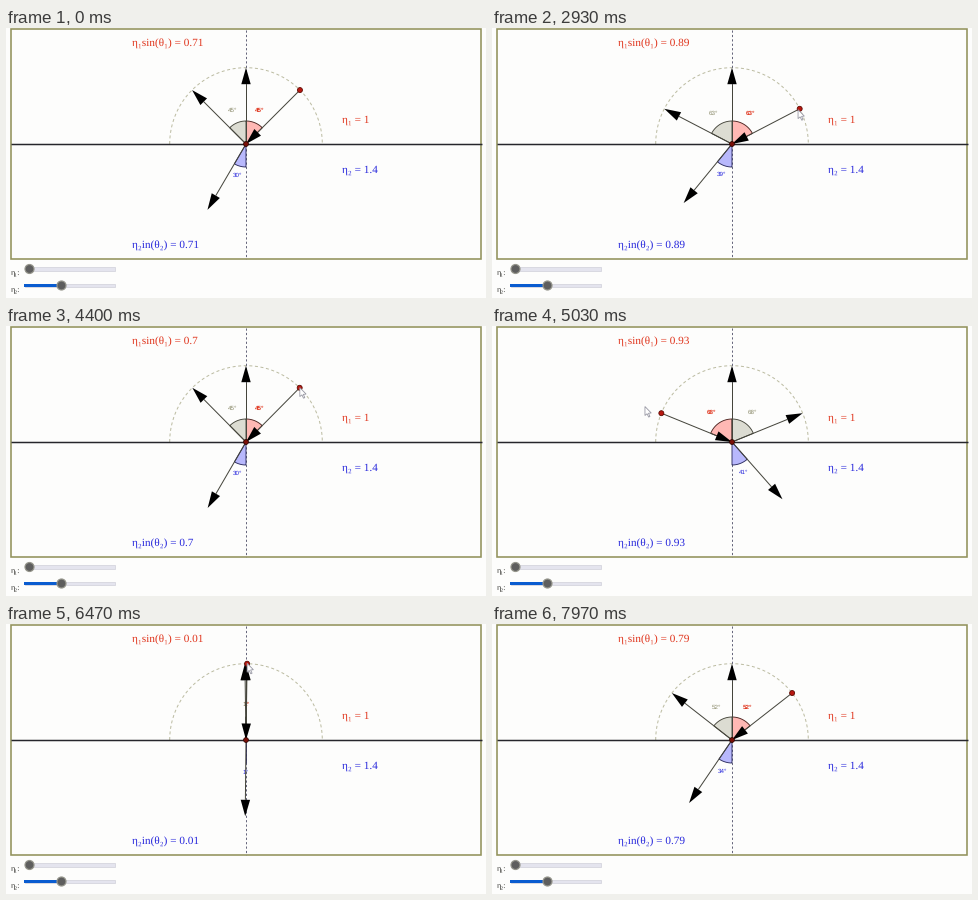
Write a matplotlib script that moves like this. It is 480 px wide and 270 px high and loops after 8000 ms.

```python
import math
import numpy as np
import matplotlib.pyplot as plt
from matplotlib.animation import FuncAnimation
from matplotlib.patches import Circle, Polygon, Rectangle

W, H, DPI = 480, 270, 60
PX = 72 / DPI                      # points per pixel
FRAMES, STEP = 250, 32             # 8000 ms
OX, OY, R = 240, 116, 76.3         # point of incidence, ray length
N1, N2 = 1, 1.4

PAPER, BORDER, INK = "#fdfdfc", "#92925c", "#26262c"
RED, BLUE, MUTED = "#e0341c", "#2626dc", "#8c8c6c"

plt.rcParams.update({
    "font.family": ["Liberation Serif", "DejaVu Serif"],
    "text.hinting": "none",
})

# pointer angle from the normal in degrees, positive to the right
ANGLE = [(0, 45), (1900, 45), (2070, 48.4), (2530, 52), (3000, 65),
         (3350, 73), (3770, 64), (4230, 60), (4980, -67.6), (5060, -68),
         (5400, -80), (6000, -40.4), (6060, -40), (7030, 64), (7400, 52),
         (8000, 52)]
REACH = [(0, 76), (4200, 74), (5030, 94), (5400, 93), (6030, 81),
         (7030, 74), (8000, 74)]
ENTER, GRAB, RELEASE, LEAVE = 1730, 1900, 7400, 7540


def curve(keys, t):
    """Monotone cubic through (time, value) keys."""
    x, y = np.array(keys, float).T
    d = np.diff(y) / np.diff(x)
    m = np.zeros(len(x))
    for i in range(1, len(x) - 1):
        if d[i - 1] * d[i] > 0:
            m[i] = 2 * d[i - 1] * d[i] / (d[i - 1] + d[i])
    i = min(max(int(np.searchsorted(x, t, side="right")) - 1, 0), len(d) - 1)
    h = x[i + 1] - x[i]
    s = (t - x[i]) / h
    return ((2 * s**3 - 3 * s**2 + 1) * y[i] + (s**3 - 2 * s**2 + s) * h * m[i]
            + (3 * s**2 - 2 * s**3) * y[i + 1] + (s**3 - s**2) * h * m[i + 1])


def polar(deg, r):
    """Point at an angle clockwise from straight up."""
    a = math.radians(deg)
    return np.array([OX + r * math.sin(a), OY - r * math.cos(a)])


def mix(a, b, s):
    return np.array(a) + (np.array(b) - np.array(a)) * s


fig = plt.figure(figsize=(W / DPI, H / DPI), dpi=DPI, facecolor=PAPER)
ax = fig.add_axes([0, 0, 1, 1])
ax.set(xlim=(0, W), ylim=(H, 0))
ax.axis("off")


def line(x, y, color, width, **kw):
    kw.setdefault("solid_capstyle", "butt")
    return ax.plot(x, y, color=color, lw=width * PX, **kw)[0]


def label(x, y, s, color, size, **kw):
    return ax.text(x, y, s, color=color, fontsize=size * PX, **kw)


def disc(x, y, r, fill, edge, width=0.8, z=6):
    return ax.add_patch(Circle((x, y), r, fc=fill, ec=edge, lw=width * PX, zorder=z))


class Ray:
    def __init__(self):
        self.shaft = line([], [], "#45453c", 1, zorder=4)
        self.head = ax.add_patch(Polygon(np.zeros((3, 2)), fc="black", lw=0, zorder=5))

    def set(self, start, tip):
        u = (tip - start) / np.hypot(*(tip - start))
        side = np.array([-u[1], u[0]]) * 4.7
        base = tip - u * 16.5
        self.shaft.set_data(*zip(start, base))
        self.head.set_xy([tip, base + side, base - side])


class Wedge:
    """Filled angle with its value beside it."""

    def __init__(self, fill, edge, color, r_text, weight="normal"):
        self.r_text = r_text
        self.area = ax.add_patch(Polygon(np.zeros((3, 2)), fc=fill, ec=edge,
                                         lw=0.9 * PX, zorder=3))
        self.text = label(0, 0, "", color, 6.3, family="Liberation Sans",
                          weight=weight, ha="center", va="center")

    def set(self, a, b):
        arc = [polar(d, 23) for d in np.linspace(a, b, 30)]
        self.area.set_xy([(OX, OY)] + arc)
        self.text.set_position(polar((a + b) / 2, self.r_text))
        self.text.set_text(f"{abs(b - a):.0f}°")


def slider(y, knob, name):
    label(4.5, y + 6.5, f"{name}:", "#30302c", 8.3)
    ax.add_patch(Rectangle((18.5, y - 1.8), 90, 3.6, fc="#e4e4ee", ec="#d0d0da",
                           lw=0.7 * PX))
    if knob > 30:
        ax.add_patch(Rectangle((18, y - 1.6), knob - 18, 3.2, fc="#0a5cd0", lw=0))
    disc(knob, y, 4.5, "#5e5e5e", "#96968c", 1.2)


# fixed scene
ax.add_patch(Rectangle((5, 1), 470, 230, fc="none", ec=BORDER, lw=1.6 * PX))
line([5, 476], [OY] * 2, INK, 1.5, zorder=2)
line([OX] * 2, [2, 231], "#66667c", 1, dashes=(2.2, 2.2), zorder=2)
sweep = np.array([polar(d, R) for d in np.linspace(-90, 90, 120)])
line(*sweep.T, "#bcbca2", 1, dashes=(3, 2.6), zorder=1)
label(335.5, 95, f"η₁ = {N1}", RED, 11.2)
label(335.5, 145, f"η₂ = {N2}", BLUE, 11.2)
slider(241, 23.5, "η₁")
slider(257.5, 55.5, "η₂")
disc(OX, OY, 2.4, "#7a1008", "#300400")

# moving parts
top = label(125.5, 19, "", RED, 11.2)
bottom = label(125.5, 221, "", BLUE, 11.2)
normal, incident, reflected, refracted = (Ray() for _ in range(4))
normal.set(polar(0, 0), polar(0, R))
w_in = Wedge("#ffb8b4", "#4c2420", RED, 36, "bold")
w_out = Wedge("#dcdcd2", "#44443a", MUTED, 36)
w_down = Wedge("#b8b8fc", "#2c2c60", BLUE, 32.5)
handle = disc(0, 0, 2.5, "#b81810", "#5a0800")
ARROW = np.array([(0, 0), (0, 9), (2.1, 7.2), (3.7, 10.6), (5, 10), (3.5, 6.7), (6.3, 6.5)])
cursor = ax.add_patch(Polygon(ARROW, fc="#fefefe", ec="#9494a0", lw=0.8 * PX, zorder=9))


def pointer(t, deg):
    held = polar(deg, curve(REACH, t))
    if t < GRAB:
        return mix((286, 94), held, (t - ENTER) / (GRAB - ENTER))
    if t > RELEASE:
        return mix(held, (352, 62), (t - RELEASE) / (LEAVE - RELEASE))
    return held


def draw(k):
    t = k * STEP
    deg = curve(ANGLE, t)
    sine = math.sin(math.radians(deg))
    bent = math.degrees(math.asin(sine * N1 / N2))
    value = f"{round(abs(sine) * N1, 2):g}"
    top.set_text(f"η₁sin(θ₁) = {value}")
    bottom.set_text(f"η₂in(θ₂) = {value}")

    centre, grip = polar(0, 0), polar(deg, R)
    incident.set(grip, centre)
    reflected.set(centre, polar(-deg, R))
    refracted.set(centre, polar(180 + bent, R))
    w_in.set(0, deg)
    w_out.set(0, -deg)
    w_down.set(180, 180 + bent)
    handle.set_center(grip)

    cursor.set_visible(ENTER <= t < LEAVE)
    if cursor.get_visible():
        cursor.set_xy(ARROW + pointer(t, deg))
    return []


anim = FuncAnimation(fig, draw, frames=FRAMES, interval=STEP, repeat=True,
                     repeat_delay=0, init_func=lambda: draw(0))
plt.show()
```
